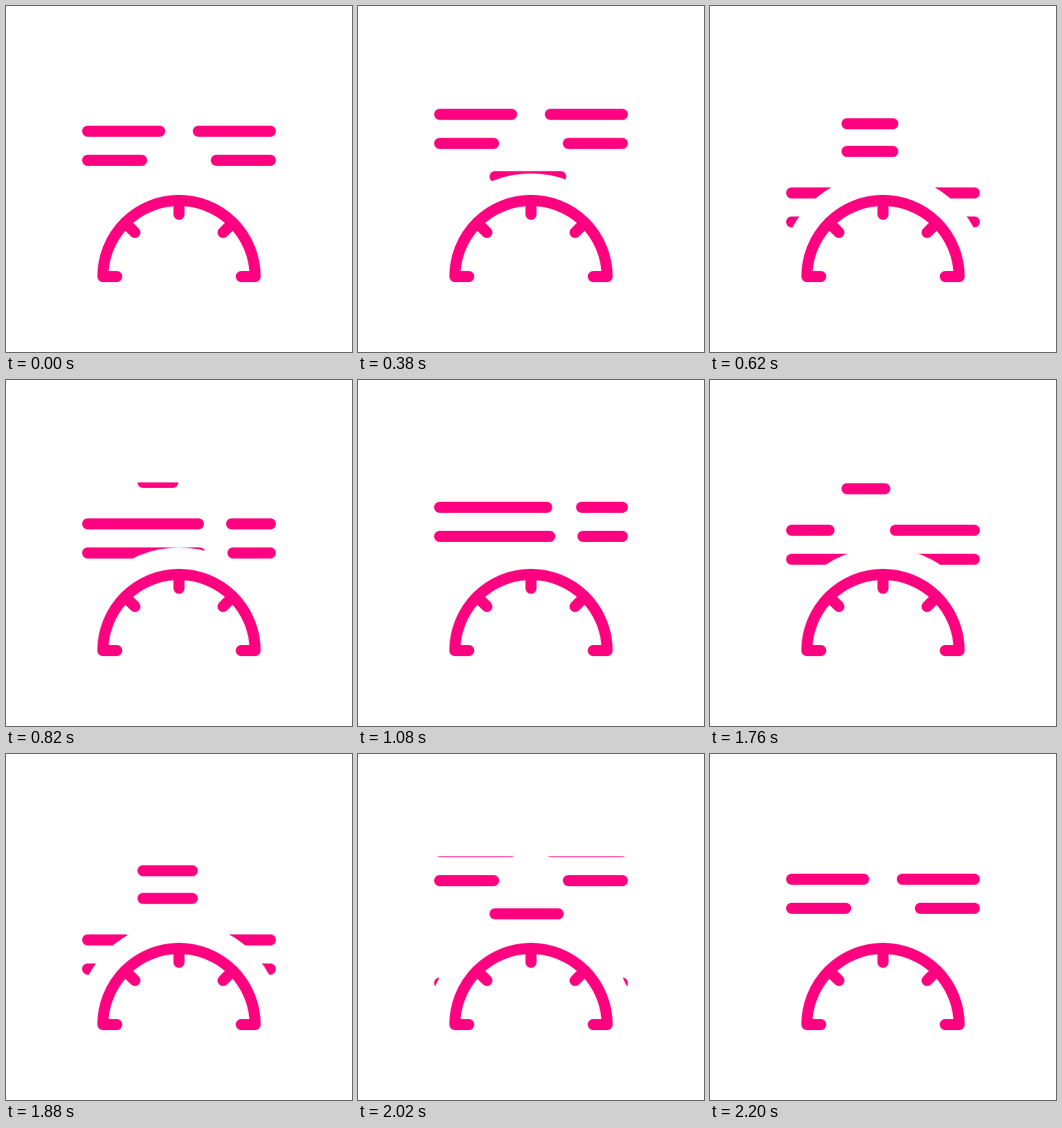
These frames come from a looping animation (500 px wide and 500 px high, 2400 ms). An HTML page:

```html
<!DOCTYPE html>
<html lang="en">
<head>
<meta charset="utf-8">
<title>Scrolling gauge</title>
<style>
  html, body { margin: 0; width: 100%; height: 100%; overflow: hidden; background: #fff; }
  svg { display: block; width: 100%; height: 100%; }

  rect { height: 16px; rx: 8px; fill: #ff0080; }
  .scroll, .pair, .slide {
    animation: 2400ms cubic-bezier(.3333, 0, .6667, 1) infinite both;
  }
  .scroll { animation-name: scroll; }
  .pair { animation-name: shrink; }
  .slide { animation-name: slide; }
  .right { transform: translateX(500px) scaleX(-1); }

  .gauge { fill: none; stroke: #ff0080; stroke-width: 16; stroke-linecap: round; stroke-linejoin: round; }

  @keyframes scroll {
    0%, 8.3333% { transform: translateY(0); }
    41.6667%, 66.6667% { transform: translateY(-187px); }
    91.6667%, 100% { transform: translateY(0); }
  }
  @keyframes shrink {
    0%, 8.3333% { width: 120px; }
    41.6667% { width: 50px; }
    66.6667% { width: 60px; }
    91.6667%, 100% { width: 120px; }
  }
  @keyframes slide {
    0%, 41.6667% { width: var(--from); }
    66.6667%, 100% { width: var(--to); }
  }
</style>
</head>
<body>
<svg viewBox="0 0 500 500">
  <clipPath id="window"><path d="M0 148.5H500V500H0Z"/></clipPath>

  <g clip-path="url(#window)">
    <g class="scroll">
      <rect x="110" y="173" width="120"/>
      <rect x="110" y="215" width="94"/>
      <rect class="pair" x="190" y="263"/>
      <rect class="pair" x="190" y="303"/>
      <rect class="slide" x="110" y="363" style="--from: 176px; --to: 70px"/>
      <rect class="slide" x="110" y="405" style="--from: 178px; --to: 119px"/>
      <g class="right">
        <rect x="110" y="173" width="120"/>
        <rect x="110" y="215" width="94"/>
        <rect class="slide" x="110" y="363" style="--from: 72px; --to: 130px"/>
        <rect class="slide" x="110" y="405" style="--from: 70px; --to: 128px"/>
      </g>
    </g>
  </g>

  <!-- hides the lines around the gauge -->
  <circle cx="250" cy="391" r="149" fill="#fff"/>

  <g class="gauge" transform="translate(250 391)">
    <path d="M-90 0H-110A110 110 0 0 1 110 0H90"/>
    <path id="tick" d="M0 -110V-90"/>
    <use href="#tick" transform="rotate(-45)"/>
    <use href="#tick" transform="rotate(45)"/>
  </g>
</svg>
</body>
</html>
```
